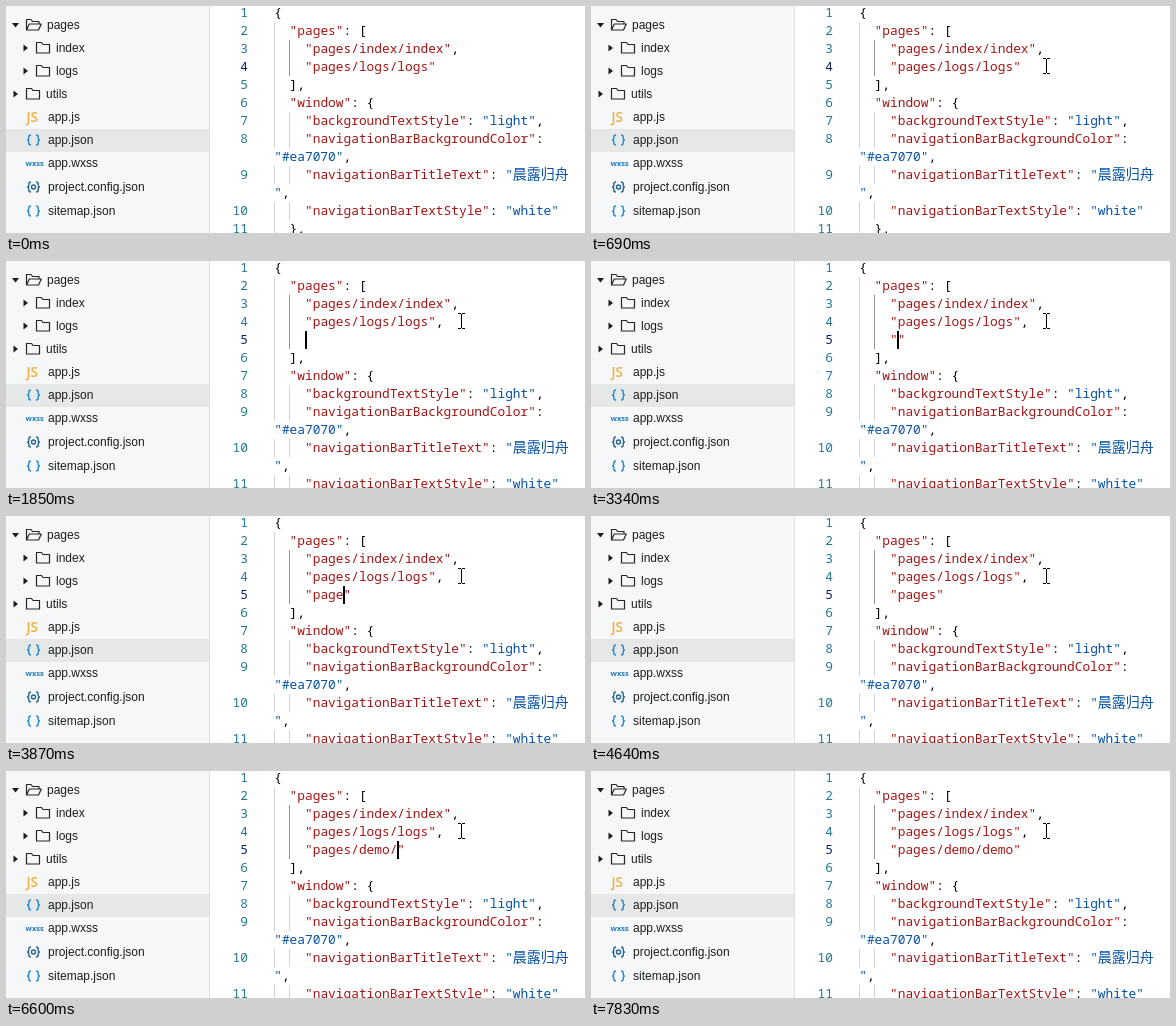
These frames come from a looping animation (579 px wide and 227 px high, 8 s). An HTML page:

```html
<!DOCTYPE html>
<html lang="en">
<head>
<meta charset="utf-8">
<title>Adding a page to app.json</title>
<style>
  html, body { margin: 0; width: 100%; height: 100%; overflow: hidden; background: #fff; }
  svg { display: block; width: 579px; height: 227px; }
  text { white-space: pre; }
  .code text { font: 12.83px "Noto Sans Mono", "DejaVu Sans Mono", monospace; }
  .code .cjk { font: 14px "Noto Sans CJK SC", "Noto Sans CJK", sans-serif; }
  .tree text { font: 12px "Liberation Sans", Arial, sans-serif; fill: #1c1c1c; }
  .tree .js { font: 600 13.5px "Open Sans", sans-serif; fill: #efae3e; }
  .tree .wxss { font: bold 7.5px "Open Sans", sans-serif; fill: #1f7cc0; }
  .folder { fill: none; stroke: #262626; stroke-width: 1.2; stroke-linejoin: round; }
  .brace { fill: none; stroke-width: 1.4; }
</style>
</head>
<body>
<svg viewBox="0 0 579 227">
  <rect width="203" height="227" fill="#f6f7f8"/>
  <rect y="123" width="203" height="23" fill="#e6e8e8"/>
  <rect x="203" width="1" height="227" fill="#dedfe0"/>
  <g class="tree" id="tree"></g>
  <g class="code" id="code"></g>
  <rect id="caret" width="2" height="18"/>
  <path id="pointer" d="M-3.5-8h3m1 0h3M0-7.5v14M-3.5 7h3m1 0h3" fill="none" stroke="#000"/>
</svg>
<script>
const LOOP = 8000, ROW = 18, TOP = -2, LEFT = 268.2, CHAR = 7.7;
const COLORS = { r: '#a31515', b: '#0451a5', k: '#000', c: '#0451a5' };
const $ = id => document.getElementById(id);

function add(parent, tag, attrs, content) {
  const el = document.createElementNS('http://www.w3.org/2000/svg', tag);
  for (const k in attrs) el.setAttribute(k, attrs[k]);
  if (content) el.textContent = content;
  parent.append(el);
  return el;
}

// File tree
const tree = $('tree');
const label = (x, y, s, cls = '') => add(tree, 'text', { x, y, class: cls }, s);

function arrow(x, y, open) {
  const d = open ? `M${x - 3.5} ${y - 2}h7l-3.5 4.5z` : `M${x - 2} ${y - 3.5}v7l4.5-3.5z`;
  add(tree, 'path', { d, fill: '#1c1c1c' });
}

function folder(x, y, open) {
  const d = open
    ? `M${x} ${y + 5}v-10.5h4.5l1.5 2h6.5v2.5M${x} ${y + 5}l2.8-6h12l-2.8 6z`
    : `M${x} ${y + 5}v-10.5h5l1.5 2h6.5v8.5z`;
  add(tree, 'path', { d, class: 'folder' });
}

function braces(y, stroke, gear) {
  const d = `M25 ${y - 5}q-2.2 0-2.2 2v1.4q0 1.6-1.8 1.6q1.8 0 1.8 1.6v1.4q0 2 2.2 2` +
    `M30 ${y - 5}q2.2 0 2.2 2v1.4q0 1.6 1.8 1.6q-1.8 0-1.8 1.6v1.4q0 2-2.2 2`;
  add(tree, 'path', { d, class: 'brace', stroke });
  if (gear) add(tree, 'circle', { cx: 27.5, cy: y, r: 2, class: 'brace', stroke });
}

arrow(9.5, 19, true);  folder(20.5, 19, true); label(41, 23, 'pages');
arrow(19.5, 42);       folder(30.5, 42);       label(50, 46, 'index');
arrow(19.5, 65);       folder(30.5, 65);       label(50, 69, 'logs');
arrow(9.5, 88);        folder(20.5, 88);       label(40, 92, 'utils');
label(20.5, 116, 'JS', 'js');     label(42, 115, 'app.js');
braces(134, '#2388d0');           label(42, 138, 'app.json');
label(19.5, 159.5, 'wxss', 'wxss'); label(42, 161, 'app.wxss');
braces(181, '#24658f', true);     label(42, 185, 'project.config.json');
braces(205, '#2388d0');           label(42, 209, 'sitemap.json');

// Editor: [indent, ...tokens]; a token starts with its colour key, indent -1 is a wrapped row
const HEAD = [
  [0, 'k{'],
  [2, 'r"pages"', 'k: ['],
  [4, 'r"pages/index/index"', 'k,']
];
const TAIL = [
  [2, 'k],'],
  [2, 'r"window"', 'k: {'],
  [4, 'r"backgroundTextStyle"', 'k: ', 'b"light"', 'k,'],
  [4, 'r"navigationBarBackgroundColor"', 'k:'],
  [-1, 'b"#ea7070"', 'k,'],
  [4, 'r"navigationBarTitleText"', 'k: ', 'b"', 'c晨露归舟'],
  [-1, 'b"', 'k,'],
  [4, 'r"navigationBarTextStyle"', 'k: ', 'b"white"'],
  [2, 'k},']
];

const COMMA = 1230, ENTER = 1850, QUOTES = 2330;
const TYPED = 'pages/demo/demo';
const KEYS = [3410, 3490, 3640, 3870, 4180, 5100, 5330, 5500, 5570, 5740, 6600, 6750, 6900, 7130, 7300];
const CARET_OFF = [[0, 70], [610, 1080], [1700, 1850], [2790, 3340], [4640, 5100], [6290, 6600], [7830, 8000]];
const POINTER = [[70, 473, 133], [147, 470, 118], [225, 467, 102], [302, 463, 85], [380, 460, 70],
  [457, 457, 60], [535, 455, 55], [612, 455, 57], [690, 455, 60]];

function drawCode(lines, active) {
  const code = $('code');
  code.replaceChildren();
  let num = 0;
  lines.forEach(([indent, ...tokens], row) => {
    const top = TOP + row * ROW, y = top + 13;
    const guide = (x, fill) => add(code, 'rect', { x, y: top, width: 1, height: ROW, fill });
    if (indent >= 2) guide(268, '#d3d3d3');
    if (indent >= 4) guide(283, row > 1 && row <= active ? '#939393' : '#d3d3d3');
    if (indent >= 0) {
      const fill = row === active ? '#0b216f' : '#237893';
      add(code, 'text', { x: 242, y, fill, 'text-anchor': 'end' }, String(++num));
    }
    const text = add(code, 'text', { x: LEFT + Math.max(indent, 0) * CHAR, y });
    for (const t of tokens) {
      add(text, 'tspan', { fill: COLORS[t[0]], class: t[0] === 'c' ? 'cjk' : '' }, t.slice(1));
    }
  });
}

let shown = '';
function render(now) {
  const t = now % LOOP;
  const comma = t >= COMMA, entered = t >= ENTER, quoted = t >= QUOTES;
  const count = KEYS.filter(k => t >= k).length;
  const active = entered ? 4 : 3;

  const state = [comma, entered, quoted, count].join();
  if (state !== shown) {
    shown = state;
    const logs = [4, 'r"pages/logs/logs"'];
    if (comma) logs.push('k,');
    const fresh = quoted ? [4, `r"${TYPED.slice(0, count)}"`] : [4];
    drawCode([...HEAD, logs, ...(entered ? [fresh] : []), ...TAIL], active);
  }

  const column = entered ? 4 + (quoted ? 1 + count : 0) : comma ? 22 : 21;
  const caret = $('caret');
  caret.setAttribute('x', Math.floor(LEFT + column * CHAR));
  caret.setAttribute('y', TOP + active * ROW);
  caret.style.display = CARET_OFF.some(([a, b]) => t >= a && t < b) ? 'none' : '';

  const spot = POINTER.filter(p => t >= p[0]).pop();
  const pointer = $('pointer');
  pointer.style.display = spot ? '' : 'none';
  if (spot) pointer.setAttribute('transform', `translate(${spot[1] + 0.5} ${spot[2] + 0.5})`);
}

const start = performance.now();
function tick() {
  render(performance.now() - start);
  requestAnimationFrame(tick);
}
tick();
</script>
</body>
</html>
```
